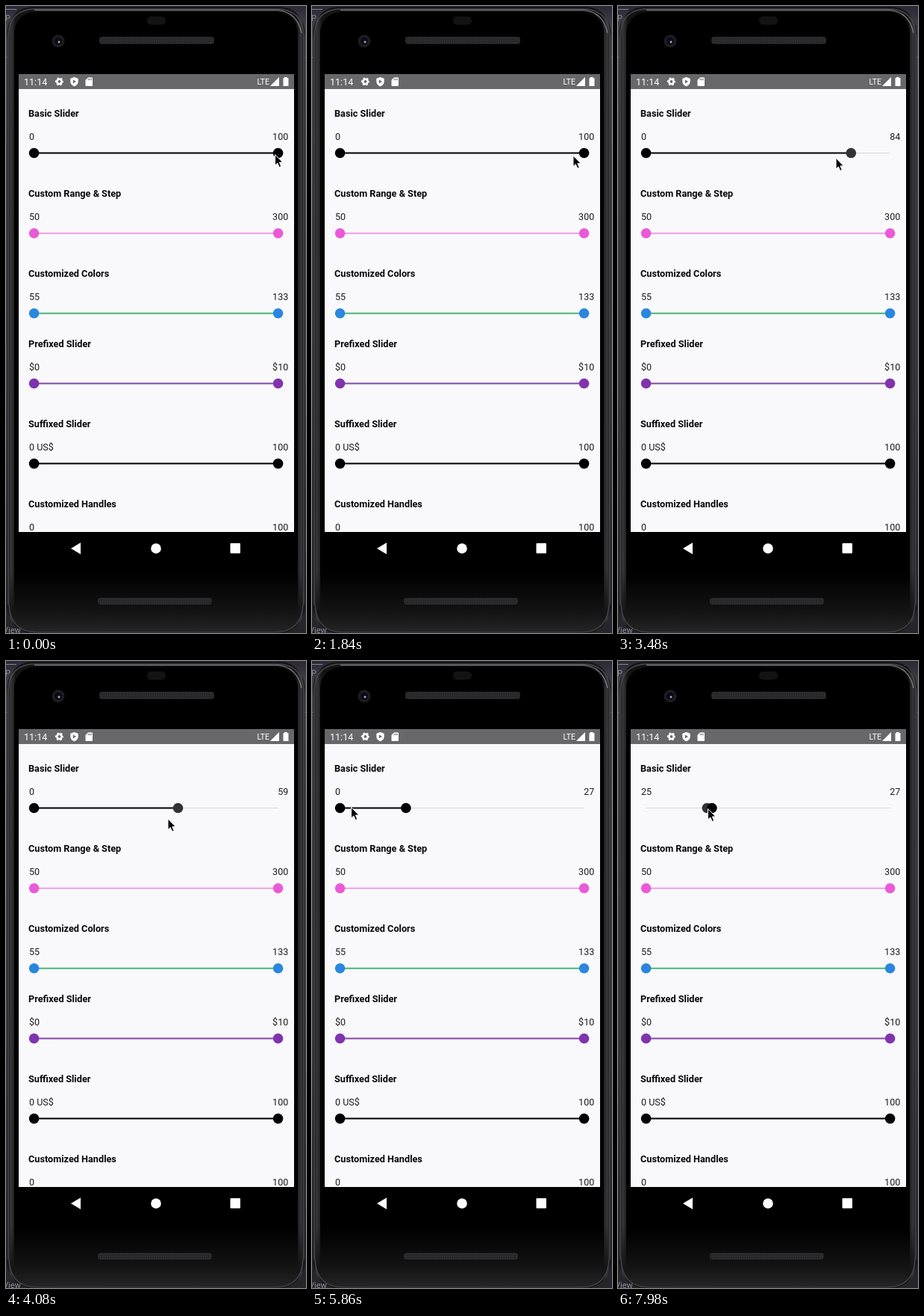
An HTML page that plays this animation: 402x838 px, repeating every 8 s.

```html
<!DOCTYPE html>
<html lang="en">
<head>
<meta charset="utf-8">
<title>Range sliders</title>
<style>
html, body { margin: 0; width: 100%; height: 100%; overflow: hidden; background: #151517; }
svg { display: block; width: 402px; height: 838px; }
text { font: 12.57px Roboto, sans-serif; fill: #1c1c1e; }
.title { font-size: 12.7px; font-weight: 700; fill: #08080a; }
.end { text-anchor: end; }
.icons, .icons text { fill: #fff; }
.desk-text { font-size: 11px; fill: #8f8c98; }
</style>
</head>
<body>
<svg viewBox="0 0 402 838">
  <defs>
    <linearGradient id="desk" x2="0" y2="1">
      <stop offset="0" stop-color="#2b2833"/>
      <stop offset=".06" stop-color="#55545e"/>
      <stop offset=".3" stop-color="#4a4952"/>
      <stop offset=".6" stop-color="#45434c"/>
      <stop offset="1" stop-color="#25242a"/>
    </linearGradient>
    <linearGradient id="rim">
      <stop offset="0" stop-color="#0a0a0b"/>
      <stop offset=".012" stop-color="#38383b"/>
      <stop offset=".03" stop-color="#131314"/>
      <stop offset=".97" stop-color="#131314"/>
      <stop offset=".988" stop-color="#38383b"/>
      <stop offset="1" stop-color="#0a0a0b"/>
    </linearGradient>
    <linearGradient id="chin" x2="0" y2="1">
      <stop offset="0" stop-color="#111112" stop-opacity="0"/>
      <stop offset=".7" stop-color="#151516"/>
      <stop offset="1" stop-color="#252527"/>
    </linearGradient>
    <pattern id="mesh" width="3" height="3" patternUnits="userSpaceOnUse">
      <path fill="#252527" d="M0 0h3v3H0z"/><path fill="#37373a" d="M0 0h1.5v1.5H0z"/>
    </pattern>
    <clipPath id="view"><path d="M17 91h369v612H17z"/></clipPath>
  </defs>

  <path fill="url(#desk)" d="M0 0h402v838H0z"/>
  <path stroke="#86858f" d="M0 68.5h4M399 68.5h3M0 4.5h14"/>
  <text class="desk-text" x="-1" y="20">P</text>

  <rect x="1.5" y="1" width="399" height="837" rx="34" fill="url(#rim)"/>
  <rect x="11" y="8" width="380" height="822" rx="28"/>
  <path fill="url(#chin)" d="M5 755h392v47q0 35-35 35H40q-35 0-35-35z"/>
  <path fill="none" stroke="#4a4a4e" stroke-width="1.5" d="M3 800V40Q4 4 40 4H362Q398 4 399 40V800"/>
  <path fill="none" stroke="#8c8c90" stroke-width="1.2" d="M38 5.500H364Q390 8 396 36"/>
  <path fill="none" stroke="#4a4a4e" stroke-width="1.2" d="M4 800Q6 836 40 837H362Q396 836 398 800"/>
  <text class="desk-text" x="-4" y="838">View</text>

  <rect x="125" y="41" width="154" height="10" rx="4" fill="url(#mesh)"/>
  <rect x="123" y="791" width="153" height="9" rx="4" fill="url(#mesh)"/>
  <rect x="189" y="14" width="25" height="11" rx="5" fill="#131314"/>
  <circle cx="70" cy="47" r="8.500" fill="#1c1c22"/>
  <circle cx="70" cy="47" r="5" fill="#0b0b12"/>
  <circle cx="71" cy="48" r="1.500" fill="#a8aac0"/>

  <path fill="#f9f9fb" d="M17 91h369v612H17z"/>
  <path fill="#68686b" d="M17 91h369v20H17z"/>
  <g class="icons">
    <text x="24" y="105.700">11:14</text>
    <g transform="translate(71.500 101)" fill="none" stroke="#fff">
      <circle r="3.200" stroke-width="2.600"/>
      <circle r="4.800" stroke-width="1.600" stroke-dasharray="2.400 2.627" stroke-dashoffset="1.200"/>
    </g>
    <path d="M91.500 95l5.200 2v4q0 4.200-5.200 6.400-5.200-2.200-5.200-6.400v-4z"/>
    <path fill="#68686b" d="M89.800 98.400v5.200l4.200-2.600z"/>
    <path d="M110 95.500h5q1 0 1 1v9.500q0 1-1 1h-7.500q-1 0-1-1v-7z"/>
    <path stroke="#68686b" d="M110.200 97v2.300M112.200 97v2.300M114.200 97v2.300"/>
    <text x="336.500" y="105" style="font-size:10.500px">LTE</text>
    <path d="M366 95v12h-12z"/>
    <path d="M373 95h3.500v1.300h2v10.700h-7V96.300h1.500z"/>
    <path d="M87 725l13-7.700v15.400z"/>
    <circle cx="201" cy="725" r="6.800"/>
    <rect x="300.500" y="718" width="13.500" height="13.500" rx="1"/>
  </g>

  <g id="rows" clip-path="url(#view)"></g>
  <path id="cursor" d="M0 0V14.500L3.300 11.500 5.700 17 8.200 15.900 5.900 10.500H10.300Z"
        fill="#050505" stroke="#fff" stroke-width="1" stroke-linejoin="round"/>
</svg>
<script>
const LEFT = 37.6, SPAN = 327, LOOP = 8000;
const LAG = 3; // steps by which a dragged handle trails the pointer
const rowsGroup = document.getElementById('rows');
const cursor = document.getElementById('cursor');

function add(tag, attrs, text = '') {
  const el = document.createElementNS('http://www.w3.org/2000/svg', tag);
  for (const key in attrs) el.setAttribute(key, attrs[key]);
  el.textContent = text;
  return rowsGroup.appendChild(el);
}

function addRow(y, title, low, high, color, rail) {
  add('text', { class: 'title', x: 30, y: y - 48.3 }, title);
  const lowLabel = add('text', { x: 31, y: y - 17.5 }, low);
  const highLabel = add('text', { class: 'end', x: 378.3, y: y - 17.5 }, high);
  add('path', { d: `M${LEFT} ${y}h${SPAN}`, stroke: '#d4d4e2', 'stroke-width': 1 });
  const bar = add('line', { x1: LEFT, x2: LEFT + SPAN, y1: y, y2: y, stroke: rail, 'stroke-width': 2 });
  const knob = x => add('circle', { cx: x, cy: y, r: 6.8, fill: color });
  return { lowLabel, highLabel, bar, lowKnob: knob(LEFT), highKnob: knob(LEFT + SPAN) };
}

const basic = addRow(196.5, 'Basic Slider', '0', '100', '#000', '#000');
addRow(303.7, 'Custom Range & Step', '50', '300', '#ea5ad8', '#eba2e6');
addRow(410.7, 'Customized Colors', '55', '133', '#2a86de', '#45b878');
addRow(504.5, 'Prefixed Slider', '$0', '$10', '#8033ae', '#8446a6');
addRow(611.6, 'Suffixed Slider', '0 US$', '100', '#000', '#000');
addRow(718.5, 'Customized Handles', '0', '100', '#000', '#000');

// Each key is [step, x, y]
const pointerKeys = [
  [0, 360.5, 198.5], [10, 356, 200], [22, 348, 201], [40, 350, 200], [54, 361, 195.5],
  [62, 362, 195.5], [85, 228, 210.5], [88, 217, 211], [108, 123.3, 202], [113, 123.3, 201],
  [122, 56, 196], [125, 52.5, 195.5], [134, 39, 195], [140, 39, 195], [143, 62, 195.5],
  [146, 89.5, 196], [149, 105, 196.5], [154, 115, 197], [165, 120.5, 197.5]
];
const highDrag = { from: 60, to: 113, start: 100 };
const lowDrag = { from: 137, to: Infinity, start: 0 };

function pointer(step, column = 1) {
  const next = pointerKeys.findIndex(key => key[0] > step);
  if (next === 0) return pointerKeys[0][column];
  if (next < 0) return pointerKeys[pointerKeys.length - 1][column];
  const a = pointerKeys[next - 1], b = pointerKeys[next];
  return a[column] + (b[column] - a[column]) * (step - a[0]) / (b[0] - a[0]);
}

function dragValue({ from, to, start }, step) {
  const seen = Math.max(from, Math.min(step, to) - LAG);
  return Math.round(start + (pointer(seen) - pointer(from)) / SPAN * 100);
}

function setHandle(knob, label, edge, drag, step) {
  const value = dragValue(drag, step);
  const pressed = step >= drag.from && step < drag.to;
  const x = LEFT + SPAN * value / 100;
  knob.setAttribute('cx', x);
  knob.setAttribute('fill', pressed ? '#333335' : '#000');
  basic.bar.setAttribute(edge, x);
  label.textContent = value;
}

// The picture advances three steps every 140 ms, held for 20, 100 and 20 ms.
function stepAt(t) {
  const phase = t % 140;
  return Math.floor(t / 140) * 3 + (phase >= 20) + (phase >= 120);
}

function draw(now) {
  const step = stepAt(now % LOOP);
  setHandle(basic.lowKnob, basic.lowLabel, 'x1', lowDrag, step);
  setHandle(basic.highKnob, basic.highLabel, 'x2', highDrag, step);
  cursor.setAttribute('transform', `translate(${pointer(step)} ${pointer(step, 2)})`);
  requestAnimationFrame(draw);
}
draw(0);
</script>
</body>
</html>
```
